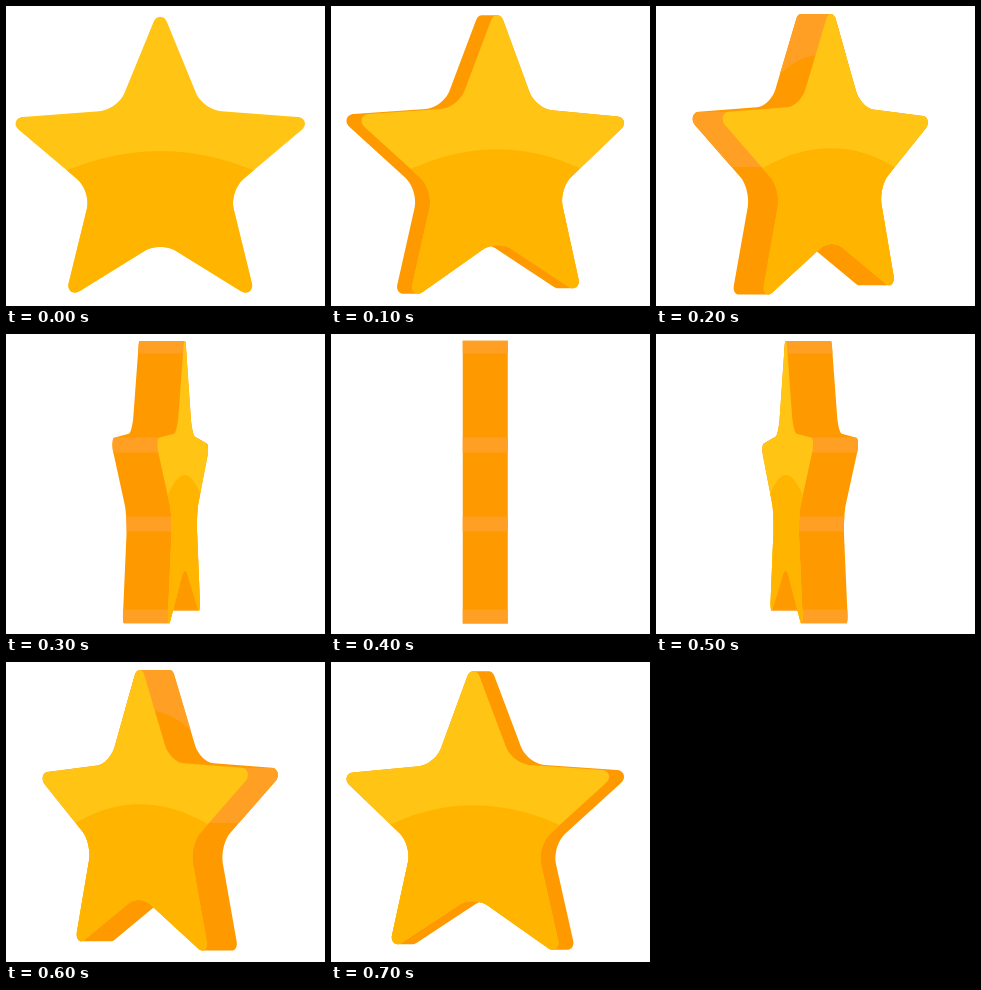
An HTML page with a canvas for the animation above (800 ms loop, 319x300 px).

```html
<!DOCTYPE html>
<html lang="en">
<head>
<meta charset="utf-8">
<title>Turning star</title>
<style>
  html, body { margin: 0; width: 100%; height: 100%; overflow: hidden; background: #fff; }
  canvas { display: block; }
</style>
</head>
<body>
<canvas id="stage" width="319" height="300"></canvas>
<script>
const ctx = document.getElementById('stage').getContext('2d');
const MID = 154.25, HORIZON = 150, VIEW = 1800, DEPTH = 45;
const STEP = 100, STEPS = 8, TURN = [0, 25, 45, 80, 90];
const FACE = '#ffc414', FACE_LOW = '#ffb500', WALL = '#ff9900', WALL_LIT = '#ffa024';

const mix = (a, b, t) => [a[0] + (b[0] - a[0]) * t, a[1] + (b[1] - a[1]) * t];

function cubic(a, b, c, d, t) {
  const m = mix(b, c, t);
  return mix(mix(mix(a, b, t), m, t), mix(m, mix(c, d, t), t), t);
}

// Five-pointed star around x = 0 with its corners rounded off.
function makeStar() {
  const corners = Array.from({ length: 10 }, (_, i) => {
    const a = i * Math.PI / 5, r = i % 2 ? 72.6 : 163;
    return [r * Math.sin(a), 162.6 - r * Math.cos(a)];
  });
  return corners.flatMap((p, i) => {
    const inner = i % 2, trim = inner ? 18.5 : 17.7, pull = inner ? 0.55 : 0.42;
    const toward = q => mix(p, q, trim / Math.hypot(q[0] - p[0], q[1] - p[1]));
    const a = toward(corners[(i + 9) % 10]), d = toward(corners[(i + 1) % 10]);
    const b = mix(a, p, pull), c = mix(d, p, pull);
    return Array.from({ length: 17 }, (_, n) => cubic(a, b, c, d, n / 16));
  });
}

// Lower part of the face, under a shallow arc.
function makeShade() {
  const arc = Array.from({ length: 41 }, (_, i) => {
    const x = (i - 20) * 7.5;
    return [x, 145 + x * x / 450];
  });
  return [...arc, [150, 300], [-150, 300]];
}

const star = makeStar(), shade = makeShade();

function trace(path, pts) {
  pts.forEach(([x, y], i) => i ? path.lineTo(x, y) : path.moveTo(x, y));
  path.closePath();
  return path;
}

// Lit parts of the wall: bands when nearly side on, a soft glow at the half-way angle.
function bands() {
  const p = new Path2D();
  for (const y of [12, 111, 190, 283]) p.rect(0, y - 7.5, 319, 15);
  return p;
}

function glow() {
  const p = new Path2D();
  p.moveTo(100, 0);
  p.lineTo(190, 0);
  p.lineTo(190, 48);
  p.lineTo(160, 49);
  p.quadraticCurveTo(140, 52, 122, 70);
  p.closePath();
  p.rect(20, 106, 90, 55);
  return p;
}

const LIT = [null, null, glow(), bands(), bands()];

// Perspective turn that keeps face and wall together centred on the stage.
function projector(turn, slide) {
  const a = TURN[turn] * Math.PI / 180, c = Math.cos(a), s = Math.sin(a);
  const scale = x => VIEW / (VIEW + x * s);
  const xs = star.map(([x]) => x * c * scale(x));
  const shift = MID - (Math.min(...xs) - slide + Math.max(...xs)) / 2;
  return ([x, y]) => [shift + x * c * scale(x), HORIZON - 4 * s + (y - HORIZON) * scale(x)];
}

function drawWalls(front, slide, lit) {
  // The face joins the walls' path, wound the same way, so no seam shows.
  const walls = trace(new Path2D(), [...front].reverse());
  const back = front.map(([x, y]) => [x - slide, y]);
  front.forEach((a, i) => {
    const j = (i + 1) % front.length;
    if (front[j][1] < a[1]) trace(walls, [a, front[j], back[j], back[i]]);
  });
  ctx.fillStyle = WALL;
  ctx.fill(walls);
  if (!lit) return;
  ctx.save();
  ctx.clip(walls);
  ctx.fillStyle = WALL_LIT;
  ctx.fill(lit);
  ctx.restore();
}

function drawFace(front, low) {
  const face = trace(new Path2D(), front);
  ctx.fillStyle = FACE;
  ctx.fill(face);
  ctx.save();
  ctx.clip(face);
  ctx.fillStyle = FACE_LOW;
  ctx.fill(trace(new Path2D(), low));
  ctx.restore();
}

function draw(step) {
  const flip = step > STEPS / 2;
  const turn = flip ? STEPS - step : step;
  const slide = Math.min(DEPTH, 15 * turn);
  const project = projector(turn, slide);
  const front = star.map(project);
  ctx.setTransform(1, 0, 0, 1, 0, 0);
  ctx.fillStyle = '#fff';
  ctx.fillRect(0, 0, 319, 300);
  if (flip) ctx.setTransform(-1, 0, 0, 1, 2 * MID, 0);
  if (turn > 0) drawWalls(front, slide, LIT[turn]);
  if (TURN[turn] < 90) drawFace(front, shade.map(project));
}

const start = performance.now();
function tick() {
  draw(Math.floor((performance.now() - start) / STEP) % STEPS);
  requestAnimationFrame(tick);
}
tick();
</script>
</body>
</html>
```
